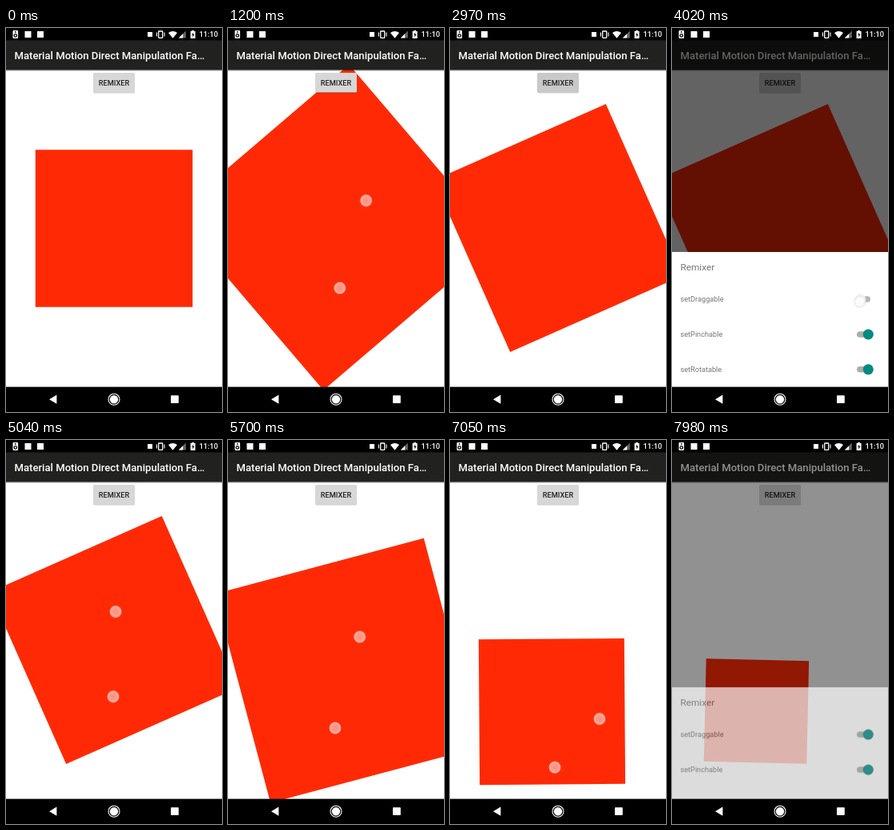
Animation of 270 by 480 pixels, one loop 8000 ms. Source, as an HTML page:

```html
<!DOCTYPE html>
<html lang="en">
<head>
<meta charset="utf-8">
<title>Direct manipulation demo</title>
<style>
  html, body { margin: 0; width: 100%; height: 100%; overflow: hidden; background: #fff; }
  svg { display: block; width: 100vw; height: 100vh; font-family: Roboto, "Noto Sans", sans-serif; }

  .square, .finger, .button, .panel, .scrim, .track, .tap,
  .switching .thumb, .switching .track { animation: 8s infinite; }

  /* The manipulated square */
  .square { fill: #ff2a05; animation-name: square; animation-timing-function: ease-in-out; }
  @keyframes square {
    0%, 8%  { transform: translate(135px, 250.5px) rotate(0deg) scale(1.965); }
    14.25%  { transform: translate(135px, 249.5px) rotate(-42deg) scale(2.95); animation-timing-function: ease-in; }
    15%     { transform: translate(135.3px, 249.2px) rotate(-40.6deg) scale(2.89); animation-timing-function: linear; }
    16.875% { transform: translate(135px, 250px) rotate(-27deg) scale(2.42); animation-timing-function: ease-out; }
    23.625% { transform: translate(135px, 250.5px) rotate(-1.6deg) scale(2.115); }
    29.25%  { transform: translate(135px, 250px) rotate(-25deg) scale(2.37); }
    31.25%, 63.25% { transform: translate(135px, 250px) rotate(-23.9deg) scale(2.35); }
    70.5%   { transform: translate(150px, 290px) rotate(-15deg) scale(2.7); }
    79.125% { transform: translate(79px, 167px) rotate(-8.6deg) scale(2.85); }
    85.625% { transform: translate(148px, 340px) rotate(-2deg) scale(2.32); }
    90.75%, 100% { transform: translate(105.5px, 339px) rotate(1.3deg) scale(1.285); }
  }

  /* Two fingers of the pinch and rotate gestures */
  .fingers { animation: touching 8s step-end infinite; }
  @keyframes touching {
    0% { opacity: 0; }
    7.4% { opacity: 1; }
    31.5% { opacity: 0; }
    62% { opacity: 1; }
    92.6%, 100% { opacity: 0; }
  }
  .finger { animation-timing-function: ease-in-out; }
  .upper { animation-name: upper; }
  @keyframes upper {
    0%, 7.5% { transform: translate(183px, 262px); }
    14.25%  { transform: translate(170px, 211px); animation-timing-function: ease-in; }
    15%     { transform: translate(172.5px, 215.5px); animation-timing-function: linear; }
    16.875% { transform: translate(186px, 239px); animation-timing-function: ease-out; }
    23.625% { transform: translate(205.8px, 294px); }
    29.25%, 31.5% { transform: translate(183px, 247px); animation-timing-function: step-start; }
    62%, 63% { transform: translate(137px, 214.5px); }
    70.5%   { transform: translate(165px, 248px); }
    79.125% { transform: translate(141.7px, 124px); }
    85.625% { transform: translate(198px, 336px); }
    90.75%, 100% { transform: translate(175px, 362px); }
  }
  .lower { animation-name: lower; }
  @keyframes lower {
    0%, 7.5% { transform: translate(117px, 308px); }
    14.25%  { transform: translate(139px, 326px); animation-timing-function: ease-in; }
    15%     { transform: translate(139.7px, 325px); animation-timing-function: linear; }
    16.875% { transform: translate(138px, 327px); animation-timing-function: ease-out; }
    23.625% { transform: translate(138.5px, 352px); }
    29.25%, 31.5% { transform: translate(137px, 333px); animation-timing-function: step-start; }
    62%, 63% { transform: translate(134px, 320.7px); }
    70.5%   { transform: translate(135px, 362px); }
    79.125% { transform: translate(66.7px, 234px); }
    85.625% { transform: translate(132px, 414px); }
    90.75%, 100% { transform: translate(130px, 404px); }
  }

  /* Single taps: button, switch, outside the sheet, button */
  .tap { animation-name: tap; animation-timing-function: step-end; }
  @keyframes tap {
    0%, 37%, 51.75%, 59%, 98.5%, 100% { opacity: 0; transform: translate(137px, 70px); }
    34.875%, 96.375% { opacity: 1; transform: translate(137px, 70px); }
    50.25% { opacity: 1; transform: translate(235px, 342px); }
    57.5% { opacity: 1; transform: translate(140px, 170px); }
  }
  .button { fill: #d6d7d6; animation-name: press; }
  @keyframes press {
    0%, 34.875%, 39.5%, 96.375% { fill: #d6d7d6; }
    36.5%, 98% { fill: #c2c3c2; }
    99.5%, 100% { fill: #d6d7d6; }
  }

  /* Bottom sheet and the dimming behind it */
  .panel { animation-name: panel; }
  @keyframes panel {
    0%, 37.25%, 61.1%, 98.75% { opacity: 0; transform: translateY(96px); }
    38.25%, 99.75% { opacity: .68; transform: translateY(29.3px); }
    39.5%, 59.25% { opacity: 1; transform: translateY(0); }
    100% { opacity: .75; transform: translateY(24px); }
  }
  .scrim { animation-name: scrim; }
  @keyframes scrim {
    0%, 37.25%, 61.1%, 98.75% { opacity: 0; }
    38.25%, 99.75% { opacity: .43; }
    39.5%, 59.25% { opacity: .61; }
    100% { opacity: .46; }
  }
  .label { font-size: 9.19px; fill: #757575; }
  .thumb { fill: #008a83; }
  .track { fill: #8fcdc9; animation-name: tint; }
  @keyframes tint {
    0%, 38.5%, 96%, 100% { fill: #a9aeab; }
    40%, 62% { fill: #8fcdc9; }
  }
  .switching .thumb { animation-name: thumb; animation-timing-function: ease-in-out; }
  @keyframes thumb {
    0%, 51.5% { transform: translateX(-9.5px); fill: #fafafa; }
    54.25%, 100% { transform: none; fill: #008a83; }
  }
  .switching .track { animation-name: track; }
  @keyframes track {
    0%, 51.5% { fill: #b5b5b5; }
    54.25%, 62% { fill: #8fcdc9; }
    96%, 100% { fill: #a9aeab; }
  }
</style>
</head>
<body>
<svg viewBox="0 0 270 480" preserveAspectRatio="none">
  <defs>
    <radialGradient id="glow">
      <stop offset="0" stop-color="#fff" stop-opacity=".48"/>
      <stop offset=".55" stop-color="#fff" stop-opacity=".52"/>
      <stop offset=".8" stop-color="#f4eeee" stop-opacity=".66"/>
      <stop offset="1" stop-color="#e6e0e0" stop-opacity=".66"/>
    </radialGradient>
    <linearGradient id="shade" x2="0" y2="1">
      <stop offset="0" stop-color="#000" stop-opacity=".5"/>
      <stop offset="1" stop-color="#000" stop-opacity="0"/>
    </linearGradient>
    <circle id="dot" r="7.4" fill="url(#glow)" stroke="#b8b0b0" stroke-opacity=".3" stroke-width=".6"/>
    <g id="switch">
      <rect class="track" x="231" y="-3.8" width="17" height="7.6" rx="3.8"/>
      <circle class="thumb" cx="245.3" r="6.5" stroke="#000" stroke-opacity=".12" stroke-width=".5"/>
    </g>
  </defs>

  <rect width="270" height="480" fill="#fff"/>
  <rect class="square" x="-50" y="-50" width="100" height="100"/>

  <rect x="109.3" y="56.8" width="51.6" height="24.6" rx="1.5" fill="#000" opacity=".2"/>
  <rect class="button" x="109" y="56" width="52" height="24.6" rx="1.4"/>
  <text x="135" y="71.8" text-anchor="middle" font-size="9.19" font-weight="500" fill="#222">REMIXER</text>

  <rect y="52" width="270" height="2.4" fill="url(#shade)"/>
  <rect y="15" width="270" height="37.3" fill="#21211f"/>
  <text x="10.5" y="39.2" font-size="13.125" font-weight="500" fill="#fff">Material Motion Direct Manipulation Fa…</text>

  <rect class="scrim" y="15" width="270" height="434" opacity="0"/>

  <g class="panel" opacity="0">
    <rect y="280" width="270" height="200" fill="#fff"/>
    <text x="10.5" y="303.2" font-size="11.8" fill="#757575">Remixer</text>
    <text class="label" x="10.5" y="342.4">setDraggable</text>
    <text class="label" x="10.5" y="386.4">setPinchable</text>
    <text class="label" x="10.5" y="430.2">setRotatable</text>
    <g class="switching" transform="translate(0 339)">
      <rect class="track" x="231" y="-3.8" width="17" height="7.6" rx="3.8"/>
      <circle class="thumb" cx="245.3" r="6.5" stroke="#000" stroke-opacity=".12" stroke-width=".5"/>
    </g>
    <use href="#switch" y="383"/>
    <use href="#switch" y="426.8"/>
  </g>

  <!-- Status bar -->
  <rect width="270" height="15.4"/>
  <g fill="#fff">
    <rect x="8.5" y="3" width="6.6" height="10" rx="1"/>
    <circle cx="11.8" cy="9.4" r="2.3" fill="#000"/>
    <circle cx="11.8" cy="9.4" r="1.1"/>
    <circle cx="11.8" cy="5" r=".9" fill="#000"/>
    <rect x="23.5" y="4" width="8" height="8"/>
    <rect x="39" y="4" width="8" height="8"/>
    <rect x="177" y="5" width="6" height="6"/>
    <rect x="190.7" y="4" width="5" height="8.4" rx=".6" fill="none" stroke="#fff" stroke-width="1.3"/>
    <path d="M188.4 5.6v5M198 5.6v5" stroke="#fff" stroke-width="1.1"/>
    <path d="M203 6q5.5-4.2 11 0l-5.5 6.8z"/>
    <path d="M215.8 12.6h9v-9z" opacity=".4"/>
    <path d="M215.8 12.6h5.4v-5.4z"/>
    <path d="M230.6 4h1.6v-1h2.8v1h1.6v9h-6z"/>
    <path d="M234.2 5.4l-2 3.4h1.2v2.6l2-3.5h-1.2z" fill="#000"/>
    <text x="265" y="11.4" text-anchor="end" font-size="9.3" font-weight="500">11:10</text>
  </g>

  <!-- Navigation bar -->
  <rect y="448.6" width="270" height="31.4"/>
  <g fill="#fff">
    <path d="M54 464.2l9.4-5.6v11.2z"/>
    <circle cx="135" cy="464.2" r="5.2"/>
    <circle cx="135" cy="464.2" r="7" fill="none" stroke="#fff" stroke-width="1.1"/>
    <rect x="206" y="459.3" width="9.8" height="9.8" rx=".8"/>
  </g>

  <g class="fingers" opacity="0">
    <use class="finger upper" href="#dot"/>
    <use class="finger lower" href="#dot"/>
  </g>
  <use class="tap" href="#dot" opacity="0"/>
</svg>
</body>
</html>
```
